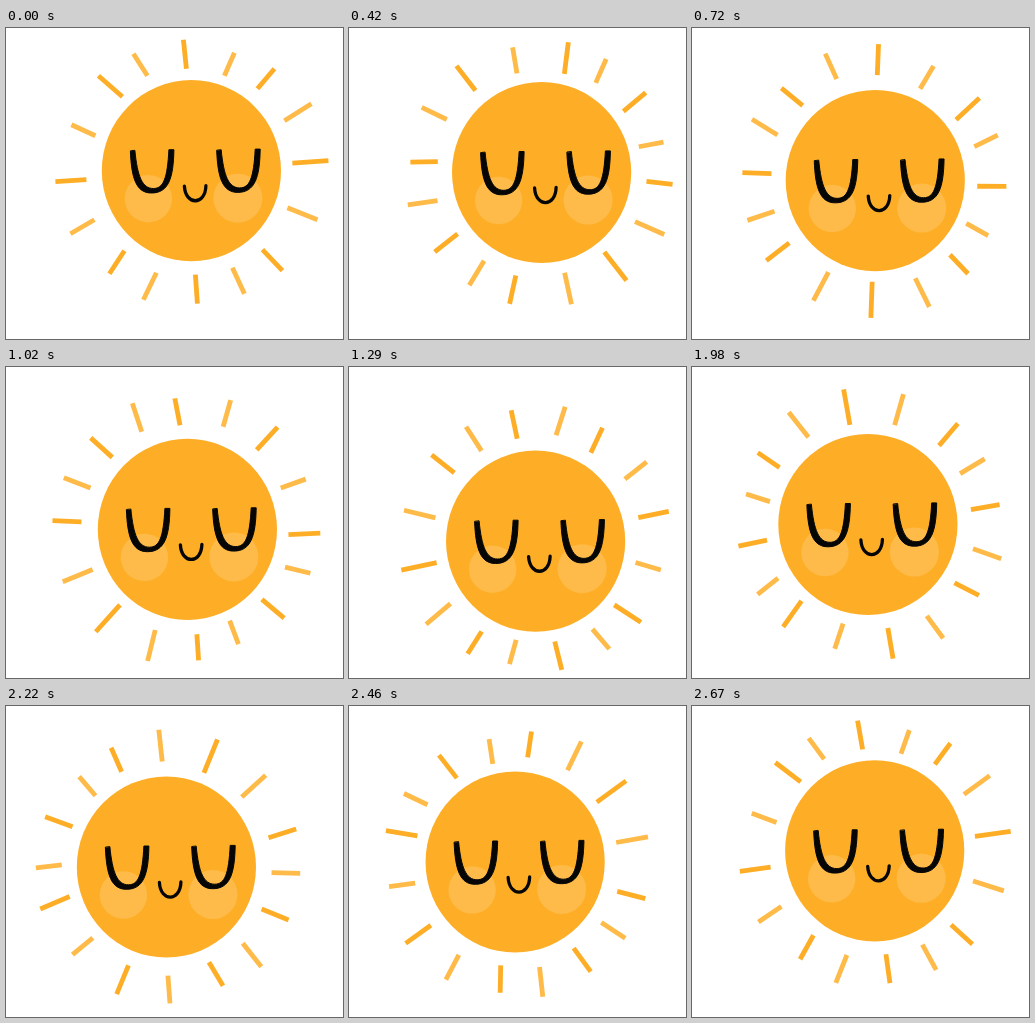
Write an HTML page that moves like this. It is 337 px wide and 311 px high and loops after 2.7 s.

```html
<!DOCTYPE html>
<html lang="en">
<head>
<meta charset="utf-8">
<title>Sleepy sun</title>
<style>
  html, body { margin: 0; width: 100%; height: 100%; overflow: hidden; background: #fff; }
  svg { display: block; }
</style>
</head>
<body>
<svg width="337" height="311" viewBox="0 0 337 311">
  <g id="sun">
    <g id="rays" stroke-width="4.8"></g>
    <ellipse rx="89.6" ry="90.6" fill="#fdae26"/>
    <g fill="#febb49">
      <circle cx="-43" cy="28" r="23.7"/>
      <circle cx="46.5" cy="27.5" r="24.5"/>
    </g>
    <g fill="#060606" stroke="#060606" stroke-linejoin="round" stroke-linecap="round">
      <path id="eye" d="M-61-19.5C-60 8-55 22.3-40 22.3C-23 22.3-18 8-17.5-21L-22.5-21C-24 8-28 17.8-38 17.8C-49 17.8-54 6-56.5-20Z"/>
      <use href="#eye" x="86.3" y="-.6"/>
      <path d="M-7 15.5C-6 35 14 35 14.5 15" fill="none" stroke-width="3.3"/>
    </g>
  </g>
</svg>
<script>
const LOOP = 2700, STEP = 30;
const sun = document.getElementById('sun'), rays = document.getElementById('rays');

// Ray ends relative to the centre: x1, y1, x2, y2
const rayEnds = [
  [101, -7.5, 137, -10], [96, 37, 126, 49], [71, 79, 91, 100], [41, 97, 53, 123],
  [4, 104, 6, 133], [-35, 102, -48, 129], [-67, 80, -82, 103], [-97, 49, -121, 63],
  [-105, 9, -136, 11], [-96, -35, -120, -46], [-69, -74, -93, -95], [-44, -95, -58, -117],
  [-5, -102, -8, -131], [33, -95, 43, -118], [66, -82, 83, -102], [93, -50, 120, -67]
];
rayEnds.forEach(([x1, y1, x2, y2], i) => {
  const ray = document.createElementNS('http://www.w3.org/2000/svg', 'path');
  ray.setAttribute('d', `M${x1} ${y1}L${x2} ${y2}`);
  ray.setAttribute('stroke', i % 2 ? '#febb49' : '#fdae26');
  rays.append(ray);
});

// Drift of the centre: time, x, y
const path = [
  [0, 185.4, 142.7], [210, 200.5, 141.5], [420, 192.6, 144.5], [570, 187, 148.3],
  [1020, 181.4, 162.4], [1350, 188, 175.5], [1590, 193.4, 173.6], [1980, 175.9, 157.5],
  [2220, 160.4, 161], [2670, 182.7, 144.8]
];
const count = path.length;
const key = i => {
  const [t, x, y] = path[(i + count) % count];
  return [t + LOOP * Math.floor(i / count), x, y];
};
const slope = (i, axis) => {
  const a = key(i - 1), b = key(i), c = key(i + 1);
  const before = b[0] - a[0], after = c[0] - b[0];
  return ((b[axis] - a[axis]) / before * after + (c[axis] - b[axis]) / after * before) / (before + after);
};

function position(t, axis) {
  let i = 0;
  while (key(i + 1)[0] <= t) i++;
  const a = key(i), b = key(i + 1), span = b[0] - a[0], u = (t - a[0]) / span, v = 1 - u;
  return v * v * (1 + 2 * u) * a[axis] + u * u * (3 - 2 * u) * b[axis]
    + span * u * v * (v * slope(i, axis) - u * slope(i + 1, axis));
}

function draw(now) {
  const t = Math.floor(now % LOOP / STEP) * STEP;
  sun.setAttribute('transform', `translate(${position(t, 1)} ${position(t, 2)})`);
  rays.setAttribute('transform', `rotate(${360 * t / LOOP})`);
}

const start = performance.now();
function frame() {
  draw(performance.now() - start);
  requestAnimationFrame(frame);
}
frame();
</script>
</body>
</html>
```
